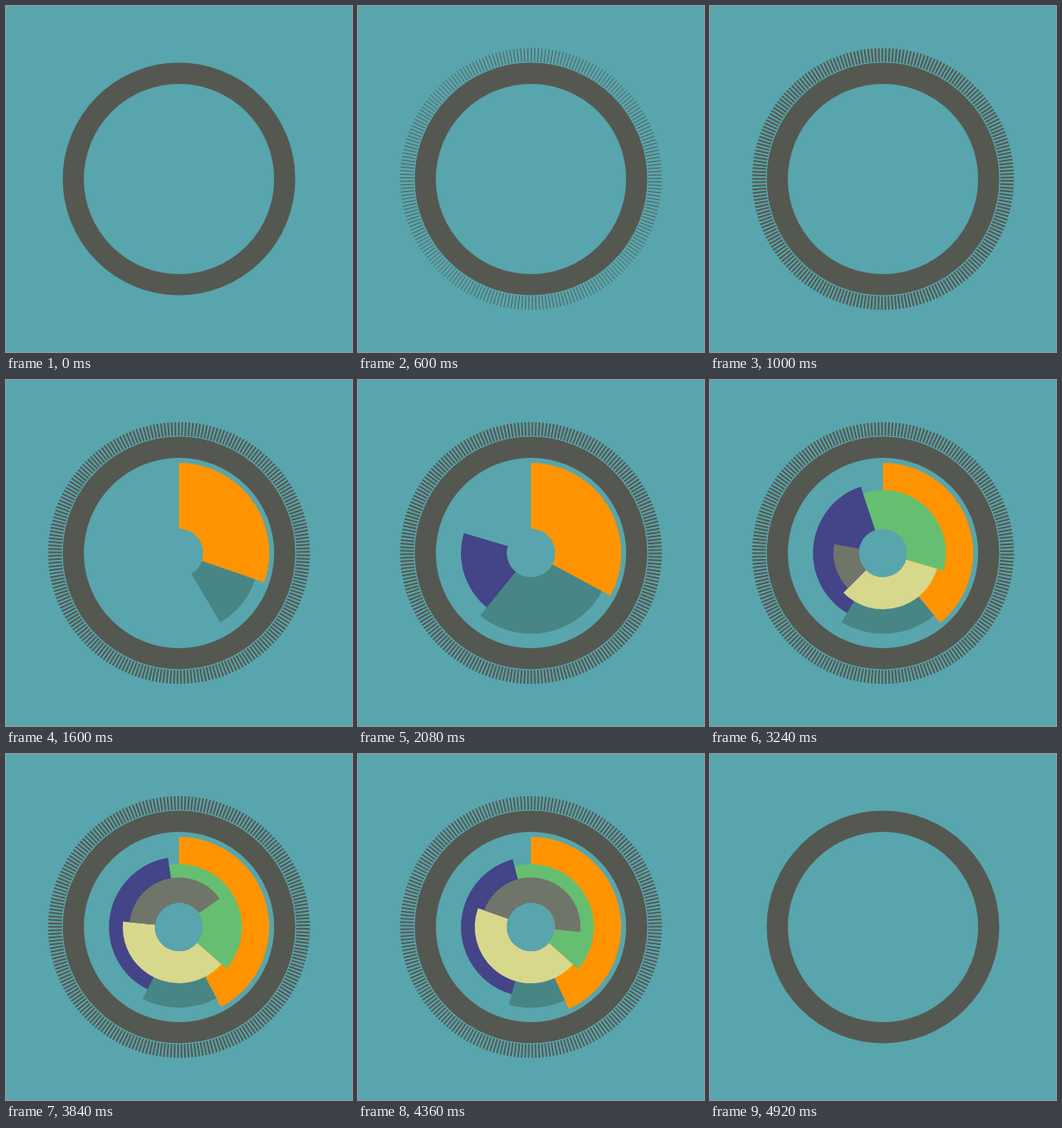
An HTML page with a canvas for the animation above (5.2 s loop, 400 by 400 pixels).

```html
<!DOCTYPE html>
<html lang="en">
<head>
<meta charset="utf-8">
<title>Spiral pie</title>
<style>
html, body { margin: 0; width: 100%; height: 100%; overflow: hidden; background: #58a5ad; }
canvas { display: block; width: 400px; height: 400px; }
</style>
</head>
<body>
<canvas id="stage" width="400" height="400"></canvas>
<script>
const ctx = document.getElementById('stage').getContext('2d');
const LOOP = 5200, STEP = 40;
const DARK = '#555850', BACK = '#58a5ad';
const TICKS = 229, TICK_WIDTH = 2, SPIN = -0.005;
const FIRST = 1040, OPEN = 400, CLOSE = 4300, CLOSED = 4820, HOLE = 28;
const rad = deg => deg * Math.PI / 180;

// drift: degrees gained per second once a slice is open
const slices = [
  { color: '#ff9400', r: 104.3, drift: 19.3 },
  { color: '#488585', r: 93.3, drift: -26.3 },
  { color: '#444488', r: 81, drift: 22.6 },
  { color: '#66bf70', r: 72.7, drift: 26.2 },
  { color: '#d8d88c', r: 65, drift: 42.8 },
  { color: '#70756a', r: 57.3, drift: 71.5 }
];

const progress = (t, from, to) => Math.min(1, Math.max(0, (t - from) / (to - from)));
const smooth = p => p * p * (3 - 2 * p);
const softEase = p => (p + smooth(p)) / 2;

// Slices open one after another, drift, then all fold up together.
function spanOf(i, t) {
  const start = FIRST + i * OPEN, opened = start + OPEN;
  const drifting = Math.max(0, Math.min(t, CLOSE) - opened) / 1000;
  const full = 106 + i + slices[i].drift * drifting;
  return full * softEase(progress(t, start, opened)) * (1 - smooth(progress(t, CLOSE, CLOSED)));
}

function drawTicks(t) {
  const width = TICK_WIDTH * progress(t, 320, 920) * (1 - progress(t, CLOSE, 4920));
  if (!width) return;
  ctx.lineWidth = width;
  ctx.beginPath();
  for (let i = 0; i < TICKS; i++) {
    const a = rad(i * 360 / TICKS + (t - 1600) * SPIN - 90.14);
    const x = Math.cos(a), y = Math.sin(a);
    ctx.moveTo(x * 135.5, y * 135.5);
    ctx.lineTo(x * 151.3, y * 151.3);
  }
  ctx.stroke();
}

function drawRing() {
  ctx.lineWidth = 24.4;
  ctx.beginPath();
  ctx.arc(0, 0, 122.2, 0, Math.PI * 2);
  ctx.stroke();
}

function drawSlices(t) {
  let angle = -90;
  slices.forEach(({ color, r }, i) => {
    const span = spanOf(i, t);
    if (!span) return;
    const a = rad(angle), b = rad(angle + span);
    ctx.fillStyle = color;
    ctx.beginPath();
    ctx.arc(0, 0, r, a, b);
    ctx.arc(0, 0, HOLE, b, a, true);
    ctx.fill();
    angle += span;
  });
}

function draw(t) {
  ctx.setTransform(1, 0, 0, 1, 0, 0);
  ctx.fillStyle = BACK;
  ctx.fillRect(0, 0, 400, 400);
  ctx.translate(200, 200);
  ctx.strokeStyle = DARK;
  drawTicks(t);
  drawRing();
  drawSlices(t);
}

const begin = performance.now();
function play() {
  const t = (performance.now() - begin) % LOOP;
  draw(Math.floor(t / STEP) * STEP);
  requestAnimationFrame(play);
}
play();
</script>
</body>
</html>
```
